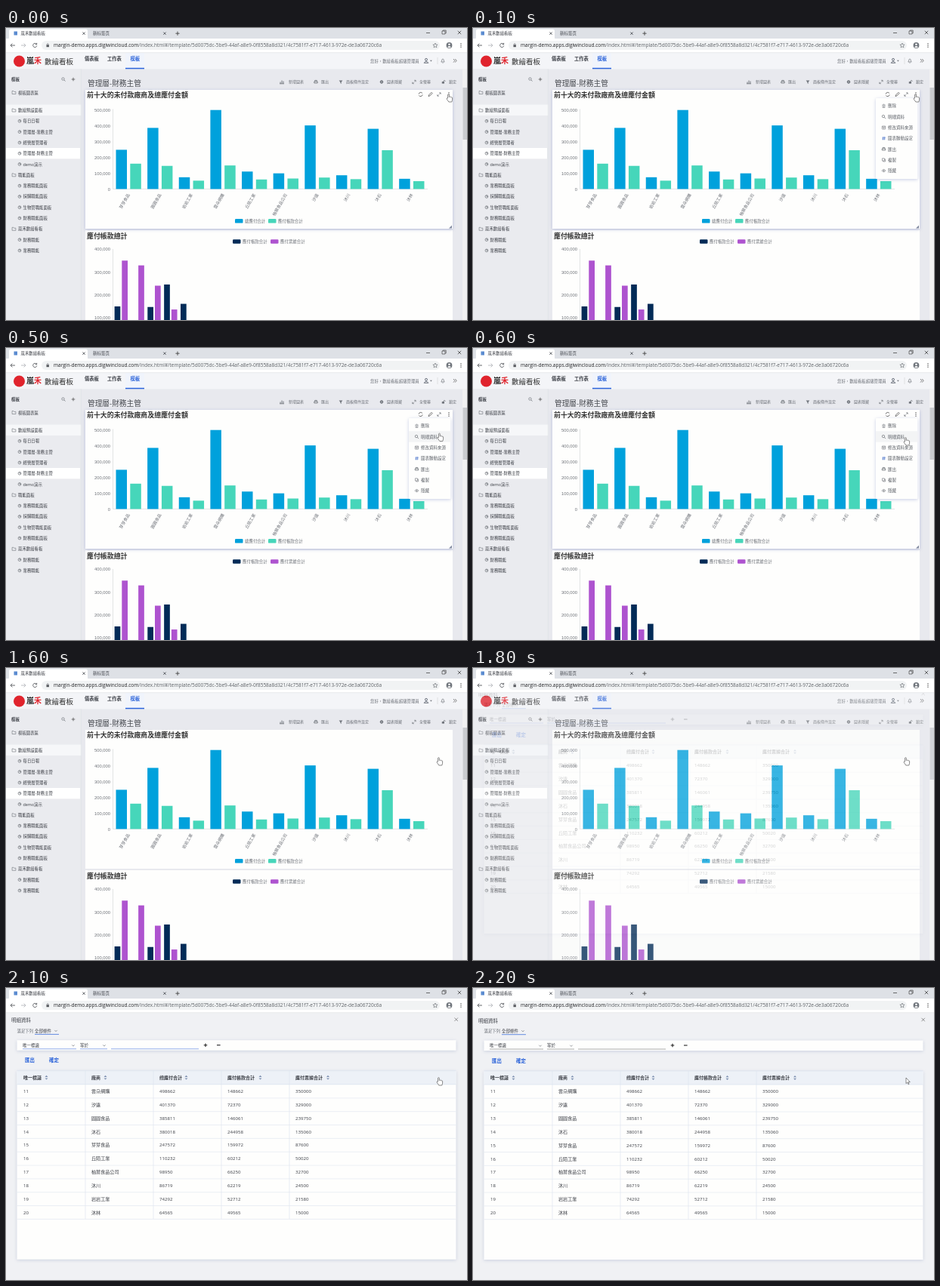
Write an HTML page that moves like this. It is 610x387 px and loops after 2.5 s.

```html
<!DOCTYPE html>
<html lang="zh-Hant">
<head>
<meta charset="utf-8">
<title>Dashboard</title>
<style>
  html, body { margin: 0; width: 100%; height: 100%; overflow: hidden; background: #fff; }
  svg { display: block; width: 100vw; height: 100vh; }
  text { font-family: 'Open Sans', 'Noto Sans CJK TC', 'Noto Sans CJK SC', 'Noto Sans CJK JP', 'Noto Sans CJK', sans-serif; white-space: pre; }
  .num { font-family: 'Liberation Sans', Arial, sans-serif; }
  .soft { filter: drop-shadow(0 1px 2px rgba(70, 90, 150, .22)); }
  .lift { filter: drop-shadow(0 1px 2px rgba(60, 80, 170, .28)); }
</style>
</head>
<body>
<svg id="stage" viewBox="0 0 610 387" preserveAspectRatio="none"></svg>
<script>
const LOOP = 2500;
const INK = '#3c3f46', GREY = '#6d7178', BLUE = '#2a62d9', PAPER = '#fefefd';
const CYAN = '#00a1dc', TEAL = '#46d6ba', NAVY = '#022b57', VIOLET = '#ae53cf';

// name, payables, notes; in category order
const vendors = [
  ['芽芽食品', 159972, 87600], ['圓圓食品', 146061, 239750],
  ['岩岩工業', 52712, 21580], ['雲朵網購', 148662, 350000],
  ['丘陌工業', 60212, 50020], ['柚葉食品公司', 66250, 32700],
  ['汐遠', 72370, 329000], ['沐川', 62219, 24500],
  ['沐石', 244958, 135060], ['沐林', 49565, 15000]
].map(([name, due, notes]) => ({ name, due, notes, total: due + notes }));
const ranked = [...vendors].sort((a, b) => b.total - a.total);

const rect = (x, y, w, h, fill, more = '') =>
  `<rect x="${x}" y="${y}" width="${w}" height="${h}" fill="${fill}" ${more}/>`;
// y is the middle of the line
const text = (x, y, size, str, fill = INK, more = '') =>
  `<text x="${x}" y="${(y + size * .37).toFixed(2)}" font-size="${size}" fill="${fill}" ${more}>${str}</text>`;
const line = (d, stroke = GREY, w = .8, more = '') =>
  `<path d="${d}" fill="none" stroke="${stroke}" stroke-width="${w}" ${more}/>`;
const shape = (d, fill) => `<path d="${d}" fill="${fill}"/>`;
const dot = (x, y, r, fill, more = '') => `<circle cx="${x}" cy="${y}" r="${r}" fill="${fill}" ${more}/>`;
const ring = (x, y, r, c = GREY, w = .8) => dot(x, y, r, 'none', `stroke="${c}" stroke-width="${w}"`);
const group = (id, body, more = '') => `<g id="${id}" ${more}>${body}</g>`;
const cross = (x, y, r, c = INK, w = .8) =>
  line(`M${x - r} ${y - r}l${2 * r} ${2 * r}m0 ${-2 * r}l${-2 * r} ${2 * r}`, c, w);
const plus = (x, y, r, c = INK, w = .8) => line(`M${x - r} ${y}h${2 * r}M${x} ${y - r}v${2 * r}`, c, w);
const dots = (x, y) => [-2.2, 0, 2.2].map(d => dot(x, y + d, .7, '#555')).join('');
const caret = (x, y, c = GREY) => line(`M${x - 1.7} ${y - .8}l1.7 1.7 1.7-1.7`, c, .7);
const bold = 'font-weight="700"';

const icons = {
  search: (x, y) => ring(x - .5, y - .5, 1.7, GREY, .7) + line(`M${x + .8} ${y + .8}l1.7 1.7`, GREY, .8),
  folder: (x, y) => line(`M${x - 2.4} ${y + 2}v-4h1.8l.7.9h2.3v3.1z`, GREY, .6),
  board: (x, y) => ring(x, y, 1.9, GREY, .7) + line(`M${x} ${y - 1.9}v1.9h1.9`, GREY, .7),
  bin: (x, y) => line(`M${x - 2} ${y - 1.4}h4M${x - 1.4} ${y - 1.2}v3.4h2.8v-3.4M${x - .7} ${y - 2.2}h1.4M${x} ${y - .4}v1.8`, GREY, .6),
  sheet: (x, y) => line(`M${x - 2.1} ${y - 1.9}h4.2v4h-4.2zM${x - 2.1} ${y - .6}h4.2M${x} ${y - .6}v2.7`, GREY, .6),
  hash: (x, y) => line(`M${x - .6} ${y - 2.3}l-.6 4.6M${x + 1.3} ${y - 2.3}l-.6 4.6M${x - 2} ${y - .9}h4.4M${x - 2.3} ${y + .9}h4.4`, '#4470c8', .6),
  print: (x, y) => line(`M${x - 2.2} ${y - .5}h4.4v2h-4.4zM${x - 1.3} ${y - .5}v-1.6h2.6v1.6`, GREY, .8),
  copy: (x, y) => line(`M${x - 2} ${y - 2}h2.8v3.2h-2.8zM${x - .8} ${y + 1.2}v1h2.8v-3.2h-1.2`, GREY, .6),
  eye: (x, y) => line(`M${x - 2.5} ${y}q2.5-3.4 5 0q-2.5 3.4-5 0z`, GREY, .6) + dot(x, y, .9, GREY),
  bars: (x, y) => line(`M${x - 2} ${y + 2}v-2M${x} ${y + 2}v-4M${x + 2} ${y + 2}v-3M${x - 3} ${y + 2.3}h6`, GREY, .9),
  funnel: (x, y) => shape(`M${x - 2.4} ${y - 2}h4.8l-1.8 2.2v2.2l-1.2-.8v-1.4z`, GREY),
  gear: (x, y) => ring(x, y, 1.6, GREY, 1.1) + plus(x, y, 2.4, GREY, .5),
  expand: (x, y) => line(`M${x + .2} ${y - 2.2}h2v2M${x - .2} ${y + 2.2}h-2v-2M${x + 2} ${y - 2}l-1.6 1.6M${x - 2} ${y + 2}l1.6-1.6`, GREY, .7),
  lock: (x, y) => rect(x - 2.2, y - .4, 3.2, 2.5, GREY) + line(`M${x} ${y - .4}v-1q1.1-1.5 2.2 0v.8`, GREY, .7)
};

function browser() {
  const url = 'margin-demo.apps.digiwincloud.com<tspan fill="#5f6368">/index.html#/template/5d0075dc-5be9-44af-a8e9-0f8558a8d321/4c7581f7-e717-4613-972e-de3a06720c6a</tspan>';
  return rect(0, 0, 610, 15, '#dee1e6') +
    shape('M2 15q2 0 2-2v-9q0-2.5 2.5-2.5h99q2.5 0 2.5 2.5v9q0 2 2 2z', '#fff') +
    rect(10.5, 4.5, 4.5, 5, '#5b8bd0') +
    text(19.5, 7.3, 5.4, '嵐禾數繪看板') + cross(103, 7.2, 1.7) +
    text(115, 7.3, 5.5, '新标签页') + cross(210, 7.2, 1.7) +
    plus(227, 7.2, 2.6, '#444', .9) +
    line('M556 6.5h5', '#333', .7) + line('M577 4h4v4h-4zM578.2 4v-1h4v4h-1', '#333', .6) + cross(600, 6, 2.2, '#333', .7) +
    rect(0, 14, 610, 19, '#fff') +
    line('M12 23h-6m2.4-2.4l-2.4 2.4 2.4 2.4', '#55585d', .9) +
    line('M20 23h6m-2.4-2.4l2.4 2.4-2.4 2.4', '#b5b7bb', .9) +
    line('M40.3 21.3a2.6 2.6 0 1 0 .5 2.3M40.7 19.8v2h-2', '#55585d', .9) +
    rect(47, 17, 527, 12, '#f1f3f4', 'rx="6"') +
    rect(53.5, 22.3, 3.4, 2.9, '#55585d') + line('M54.2 22.3v-1q1-1.5 2 0v1', '#55585d', .6) +
    text(63, 23, 6.5, url, '#202124') +
    line('M568 20l.9 2 2.2.2-1.7 1.4.5 2.2-1.9-1.1-1.9 1.1.5-2.2-1.7-1.4 2.2-.2z', '#5f6368', .6) +
    dot(586.5, 23, 3.9, '#70757c') + dot(586.5, 21.8, 1.3, '#fff') + shape('M584.1 25.3q2.4-2.8 4.8 0q-2.4 1.8-4.8 0z', '#fff') +
    dots(602, 23) + rect(0, 32.5, 610, .6, '#d9dbdf');
}

function header() {
  return rect(0, 33, 610, 21.5, '#f4f5f8') +
    dot(17.5, 44, 7.5, '#e0242d') +
    text(27, 43.5, 10, '嵐<tspan fill="#e0242d">禾</tspan>', '#2a2a2a', bold) +
    text(51, 44, 9.5, '數繪看板', '#333') +
    rect(158, 33, 25, 21, '#f0f4fc') + rect(158, 52.8, 25, 1.5, BLUE) +
    text(104, 41, 6.3, '儀表板', INK, bold) + text(134, 41, 6.3, '工作表', INK, bold) +
    text(164.5, 41, 6.3, '模板', BLUE, bold) +
    text(482, 43.5, 5.4, '您好，數繪看板超級管理員', GREY) +
    ring(556, 41.8, 1.5, '#4c5360') + line('M553.2 46.3q2.8-4.3 5.6 0z', '#4c5360', .8) +
    shape('M561 42.8h2.8l-1.4 1.7z', GREY) + line('M571 39v9', '#ccc', .5) +
    line('M575.8 45q1-1 1-3 1.2-2.4 2.4 0 0 2 1 3zM577.5 46.3h1', GREY, .7) +
    line('M592 41l1.9 2.3-1.9 2.3M594.3 41l1.9 2.3-1.9 2.3', '#555', .7);
}

function sidebar() {
  const rows = ['*數繪預設面板', '每日日報', '管理層-業務主管', '經營層管理者', '管理層-財務主管', 'demo演示',
    '*職能面板', '業務職能面板', '採購職能面板', '生物管職能面板', '財務職能面板', '*嵐禾數繪看板', '財務職能', '業務職能'];
  return rect(0, 54.5, 99.5, 333, '#eaebef') + rect(0, 101.5, 99.5, 14.5, '#f6f7f9') +
    rect(0, 159, 98, 14.3, '#fff') + line('M99.3 54.5v333', '#dcdfe5', .6) +
    text(7, 68, 5.4, '模板', INK, bold) + icons.search(76, 68) + plus(89, 68, 2.3, '#555', .8) +
    icons.folder(10.5, 85.5) + text(16, 85.5, 5.4, '模板圖表區') +
    rows.map((s, i) => {
      const y = 109 + 14.3 * i;
      return s[0] === '*'
        ? icons.folder(10.5, y) + text(16, y, 5.4, s.slice(1))
        : icons.board(18, y) + text(22.5, y, 5.4, s);
    }).join('');
}

const axisLabel = (y, v) => text(138, y, 5.8, v.toLocaleString('en-US'), GREY, 'text-anchor="end" class="num"');
const key = (x, y, fill, label) => rect(x, y - 2.8, 10.5, 5.6, fill, 'rx="1.2"') + text(x + 13, y, 5.45, label, GREY);

function totalsChart() {
  const base = 213.4, unit = 21 / 1e5, pitch = 41.63;
  let s = text(107, 88.3, 8.93, '前十大的未付款廠商及總應付金額', '#333', bold);
  for (let i = 0; i <= 5; i++) s += axisLabel(base - 21 * i, i * 1e5);
  s += line(`M141.5 107.5V${base}H558`, '#cfd2d6', .6);
  vendors.forEach((v, i) => {
    const x = 145.5 + pitch * i, a = v.total * unit, b = v.due * unit, mid = x + 16.8;
    s += rect(x, base - a, 14.5, a, CYAN) + rect(x + 18.8, base - b, 14.5, b, TEAL) +
      text(mid, 220, 5.5, v.name, GREY, `text-anchor="end" transform="rotate(-60 ${mid} 220)"`);
  });
  return s + key(303, 255.8, CYAN, '總應付合計') + key(347, 255.8, TEAL, '應付帳款合計');
}

function duesChart() {
  const base = 413.8, unit = 30.15 / 1e5;
  let s = text(107, 275.3, 8.93, '應付帳款總計', '#333', bold) +
    key(300, 283, NAVY, '應付帳款合計') + key(350, 283, VIOLET, '應付票據合計');
  for (let i = 1; i <= 4; i++) s += axisLabel(base - 30.15 * i, i * 1e5);
  s += line('M141.5 293V387', '#cfd2d6', .6);
  ranked.forEach((v, i) => {
    const x = 143.6 + 21.85 * i;
    s += rect(x, base - v.due * unit, 7.7, v.due * unit, NAVY) +
      rect(x + 9.7, base - v.notes * unit, 7.7, v.notes * unit, VIOLET);
  });
  return s;
}

function dashboard() {
  const tools = [[365, 374, 'bars', '新增圖表'], [410, 417, 'print', '匯出'], [443, 450, 'funnel', '面板條件設定'],
    [497, 504, 'gear', '圖表隱藏'], [540, 547, 'expand', '全螢幕'], [579, 586, 'lock', '鎖定']];
  const hover = line('M551 86.6a2.6 2.6 0 0 0-4.8 1M546.3 89.4a2.6 2.6 0 0 0 4.8-1', '#555', .8) +
    line('M559 90.5l.5-1.7 3.5-3.5 1.2 1.2-3.5 3.5z', '#555', .8) + icons.expand(573, 88) +
    dots(586, 88) + shape('M590 261.5v4h-4z', '#8088a0');
  return rect(0, 33, 610, 354, '#e8e9ee') + header() + sidebar() +
    text(108, 73, 9.7, '管理層-財務主管', '#44474d', 'font-weight="500"') +
    tools.map(([ix, tx, icon, s]) => icons[icon](ix, 71.5) + text(tx, 71.5, 5, s, GREY)).join('') +
    rect(105, 268, 486, 130, PAPER) +
    rect(105, 82, 486, 184, PAPER, 'id="lift" class="lift"') + rect(105, 82, 486, 184, PAPER) +
    totalsChart() + duesChart() + group('hover', hover) +
    rect(604, 54.5, 6, 333, '#f1f1f2') + rect(604.5, 79, 5.5, 69, '#c9cbcf');
}

function menu() {
  const items = [['bin', '刪除'], ['search', '明細資料'], ['sheet', '修改資料來源'], ['hash', '圖表聯動設定'],
    ['print', '匯出'], ['copy', '複製'], ['eye', '隱藏']];
  return rect(533, 93, 55.5, 107, PAPER, 'rx="1" class="lift"') +
    rect(533, 110.3, 55.5, 14.3, '#f3f4f5', 'id="mark"') +
    items.map(([icon, s], i) => {
      const y = 103.3 + 14.3 * i;
      return icons[icon](543.5, y) + text(549, y, 5.5, s, '#5c6067');
    }).join('');
}

function detail() {
  const sort = (x, y) => shape(`M${x - 2} ${y - .7}l2-2.2 2 2.2zM${x - 2} ${y + .7}l2 2.2 2-2.2z`, '#7d90b0');
  const heads = [[23, 53.5, '唯一標識'], [113, 131.5, '廠商'], [203, 238.5, '總應付合計'],
    [293, 336.5, '應付帳款合計'], [383, 426, '應付票據合計']];
  let s = text(7, 43.3, 6.5, '明細資料') + cross(595.7, 42, 2.2, '#777', .8) +
    text(14.5, 57, 5.4, '滿足下列', GREY) + text(38, 57, 5.5, '全部條件') + caret(66, 57) + line('M38 61.7h32', BLUE, .7) +
    rect(14.5, 69.5, 581, 13.5, PAPER, 'class="soft"') +
    text(22, 76, 5.5, '唯一標識') + caret(89, 76.5) + text(98, 76, 5.5, '等於') + caret(130, 76.5) +
    line('M22 81h71M98 81h36M139 81h116', '#888', .7, 'id="rule"') +
    plus(264, 76, 2.3, '#222', 1.1) + line('M279 76h4.6', '#222', 1.1) +
    text(25, 96.2, 6.4, '匯出', BLUE, bold) + text(57, 96.2, 6.4, '確定', BLUE, bold) +
    rect(14.5, 110, 581, 250, PAPER, 'class="soft"') + rect(14.5, 110, 581, 18, '#edf1f7') +
    heads.map(([x, ix, h]) => text(x, 119, 6, h, INK, bold) + sort(ix, 119)).join('');
  ranked.forEach((v, i) => {
    const y = 137.2 + 17.83 * i;
    s += [11 + i, v.name, v.total, v.due, v.notes].map((c, k) => text(23 + 90 * k, y, 6.1, c)).join('') +
      line(`M14.5 ${y + 9}h581`, '#e3e8f1', .7);
  });
  return s + line('M105 110v196.5M195 110v196.5M285 110v196.5M375 110v196.5', '#e0e6f0', .7) +
    line('M14.5 110h581M14.5 128h581', '#d9e1ee', .7);
}

const hand = '<path d="M1.6 6V1.2q.9-1.2 1.7 0V4.3q1-.7 1.5.2 1-.6 1.4.3 1.2-.4 1.4.8V8.2L6.800 11H2.9L.3 7.3q-.5-1.500.6-1.500z" fill="#fff" stroke="#555" stroke-width=".7"/>';
const arrow = '<path d="M.5.500v7.6l1.8-1.6 1.2 2.7 1.1-.5-1.2-2.6h2.4z" fill="#fff" stroke="#444" stroke-width=".6"/>';

document.getElementById('stage').innerHTML =
  '<clipPath id="page"><rect y="33" width="610" height="354"/></clipPath>' +
  dashboard() + group('menu', menu()) +
  group('detail', rect(0, 33, 610, 354, '#f0f1f4') + group('sheet', detail()), 'clip-path="url(#page)"') +
  browser() + group('hand', hand) + group('arrow', arrow, 'transform="translate(572.5 118.5)"');

const el = id => document.getElementById(id);
const show = (id, on) => el(id).setAttribute('display', on ? 'inline' : 'none');
const move = (id, x, y) => el(id).setAttribute('transform', `translate(${x} ${y})`);
const at = (keys, t) => keys.filter(k => k[0] <= t).pop();

// time, x, y
const pointer = [[0, 583, 87], [300, 573, 100.5], [400, 572, 106.5], [500, 571, 112.5], [600, 570, 118]];
// time, opacity, y shift
const entry = [[0, 0, -8], [1800, .22, -8], [2000, .97, -.9], [2100, 1, -.3], [2200, 1, 0]];

function draw(t) {
  const [, px, py] = at(pointer, t), [, alpha, shift] = at(entry, t);
  show('hover', t < 1600);
  show('lift', t < 1600);
  show('menu', t >= 100 && t < 1600);
  show('mark', t >= 500);
  show('detail', alpha > 0);
  el('detail').setAttribute('opacity', alpha);
  move('sheet', 0, shift);
  el('rule').setAttribute('stroke', t < 2200 ? '#6f92e6' : '#888');
  show('hand', t < 2200);
  show('arrow', t >= 2200);
  move('hand', px, py);
}

function tick() {
  draw(performance.now() % LOOP);
  requestAnimationFrame(tick);
}
tick();
</script>
</body>
</html>
```
